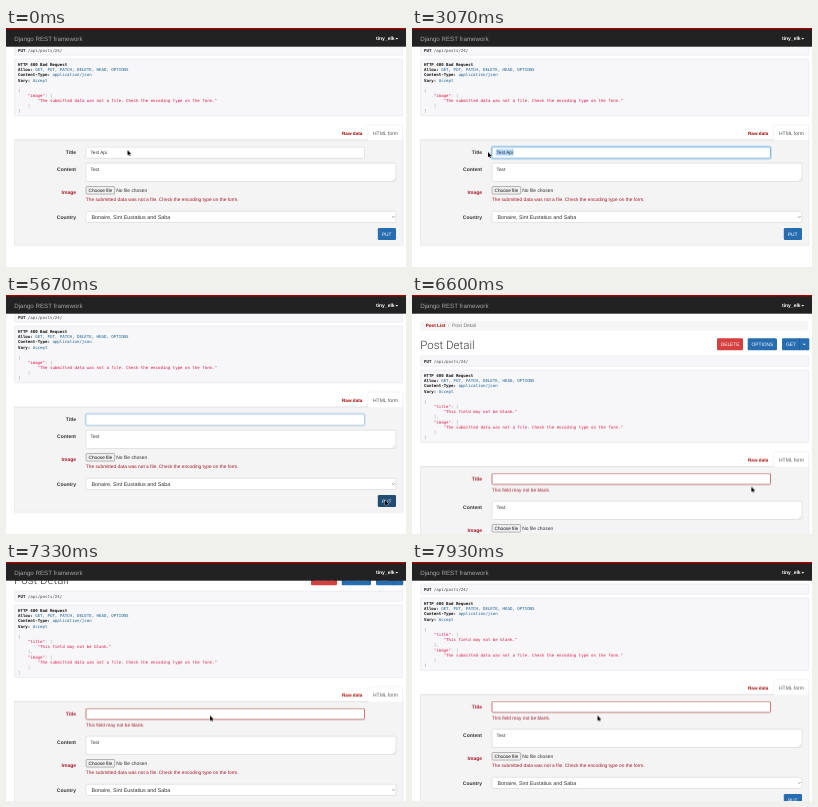
An HTML page that plays this animation: 400x239 px, repeating every 8 s.

```html
<!DOCTYPE html>
<html lang="en">
<head>
<meta charset="utf-8">
<title>Post Detail</title>
<style>
html, body { margin: 0; width: 100%; height: 100%; overflow: hidden; background: #fff; }
svg { display: block; width: 100%; height: 100%; }
text { font: 5px "Liberation Sans", Arial, sans-serif; fill: #333; text-rendering: geometricPrecision; }
.code text { font: 4.085px "DejaVu Sans Mono", "Liberation Mono", monospace; fill: #48484c; }
.code .b { font-weight: bold; fill: #111; }
.code .lit { fill: #195f91; }
.code .str { fill: #d14; }
.code .pun { fill: #93a1a1; }
.label { font-weight: bold; text-anchor: end; }
.bad { fill: #a8182a; }
.help { font-size: 4.8px; }
.link { font-weight: bold; fill: #a30000; }
.btn { fill: #fff; font-size: 4.85px; }
.field { fill: #fff; stroke: #ccc; stroke-width: .5; }
.pre { fill: #f7f7f9; stroke: #e1e1e8; stroke-width: .5; }
.panel { fill: #f4f4f4; stroke: #e0e0e0; stroke-width: .5; }

/* every part shares one 8 s clock */
.scroll, .old, .new, .grow, .error-gap, .focus, .select, .value, .caret, .press, .cursor, .shown {
  animation: 8s step-end infinite;
}
.scroll { animation-name: scroll; }
.old { animation-name: old; }
.new { animation-name: new; }
.grow { animation-name: grow; }
.error-gap { animation-name: gap; }
.focus { animation-name: focus; animation-timing-function: linear; }
.select { animation-name: select; }
.value { animation-name: value; }
.caret { animation-name: caret; }
.press { animation-name: press; }
.cursor { animation-name: cursor; animation-timing-function: ease-in-out; }
.shown { animation-name: shown; }

@keyframes scroll {
  0% { transform: translateY(-44px); }
  75% { transform: translateY(0); }
  86.6% { transform: translateY(0); animation-timing-function: ease-in-out; }
  91.63% { transform: translateY(-32px); animation-timing-function: ease-out; }
  95.9%, 100% { transform: translateY(-39px); }
}
@keyframes old { 0% { opacity: 1; } 75%, 100% { opacity: 0; } }
@keyframes new { 0% { opacity: 0; } 75%, 100% { opacity: 1; } }
@keyframes grow { 0% { transform: translateY(-15.6px); } 75%, 100% { transform: none; } }
@keyframes gap { 0% { transform: translateY(-11.4px); } 75%, 100% { transform: none; } }
@keyframes focus {
  0%, 10.8% { opacity: 0; }
  12.6%, 70% { opacity: 1; }
  71.8%, 100% { opacity: 0; }
}
@keyframes select { 0% { opacity: 0; } 37.5% { opacity: 1; } 41.6%, 100% { opacity: 0; } }
@keyframes value { 0% { opacity: 1; } 41.6%, 100% { opacity: 0; } }
@keyframes caret {
  0% { opacity: 0; }
  41.6% { opacity: 1; }
  48.3% { opacity: 0; }
  55% { opacity: 1; }
  61.6% { opacity: 0; }
  68.3% { opacity: 1; }
  70%, 100% { opacity: 0; }
}
@keyframes press { 0% { fill: #286db0; } 70% { fill: #204d74; } 75%, 100% { fill: #286db0; } }
@keyframes shown { 0% { opacity: 1; } 41.6% { opacity: 0; } 43.3%, 100% { opacity: 1; } }
@keyframes cursor {
  0% { transform: translate(121.5px, 122px); }
  4.1%, 5.8% { transform: translate(76px, 122px); }
  9.1%, 10% { transform: translate(89px, 124px); animation-timing-function: linear; }
  17.5% { transform: translate(133px, 127px); animation-timing-function: ease-out; }
  20.9%, 21.4% { transform: translate(164px, 136px); }
  31.6% { transform: translate(88px, 125px); }
  34.1%, 42.5% { transform: translate(76px, 124px); animation-timing-function: step-end; }
  43.3% { transform: translate(100px, 128px); }
  46.6%, 47.5% { transform: translate(156px, 148.5px); }
  50.9%, 52.5% { transform: translate(243px, 201.5px); animation-timing-function: ease-out; }
  57.5% { transform: translate(327.5px, 214.5px); }
  63.4% { transform: translate(350px, 215px); }
  68.75%, 81.6% { transform: translate(379px, 205px); animation-timing-function: linear; }
  82.5% { transform: translate(340.5px, 192px); animation-timing-function: ease-out; }
  85%, 98.2% { transform: translate(204px, 153.5px); }
  99.1%, 100% { transform: translate(185.5px, 153.5px); }
}
</style>
</head>
<body>
<svg viewBox="0 0 400 239" preserveAspectRatio="none">
  <rect width="400" height="239" fill="#fff"/>
  <g class="scroll">
    <!-- heading -->
    <rect x="8.5" y="25.7" width="388" height="9.8" rx="1.2" fill="#f5f5f5"/>
    <text class="link" x="13.7" y="32.2" style="font-size:4.65px">Post List</text>
    <text x="36" y="32.2" style="fill:#bbb">/</text>
    <text x="40" y="32.2" style="fill:#777">Post Detail</text>
    <text x="8.3" y="54.3" style="font:300 11.5px Roboto,'Liberation Sans',sans-serif">Post Detail</text>
    <rect x="305" y="43.3" width="26" height="12" rx="1.3" fill="#d43f3f"/>
    <text class="btn" x="308.7" y="51">DELETE</text>
    <rect x="335.7" y="43.3" width="29.3" height="12" rx="1.3" fill="#286db0"/>
    <text class="btn" x="339.5" y="51">OPTIONS</text>
    <rect x="370" y="43.3" width="27.3" height="12" rx="1.3" fill="#286db0"/>
    <path d="M387.5 43.3v12" stroke="#1f5a94" stroke-width=".5"/>
    <text class="btn" x="374" y="51">GET</text>
    <path d="M390.9 48.7h2.8l-1.4 1.5z" fill="#fff"/>

    <!-- request and response -->
    <g class="code">
      <rect class="pre" x="8.6" y="61" width="388" height="10.2" rx="1"/>
      <text x="12" y="67.6"><tspan class="b">PUT</tspan> /api/posts/24/</text>
      <rect class="pre old" x="8.6" y="75" width="388" height="56.8" rx="1"/>
      <rect class="pre new" x="8.6" y="75" width="388" height="72.4" rx="1"/>
      <text class="b" x="12" y="82">HTTP 400 Bad Request</text>
      <text x="12" y="87.2"><tspan class="b">Allow:</tspan> <tspan class="lit">GET, PUT, PATCH, DELETE, HEAD, OPTIONS</tspan></text>
      <text x="12" y="92.4"><tspan class="b">Content-Type:</tspan> <tspan class="lit">application/json</tspan></text>
      <text x="12" y="97.6"><tspan class="b">Vary:</tspan> <tspan class="lit">Accept</tspan></text>
      <text class="pun" x="12" y="107.8">{</text>
      <g class="new">
        <text x="21.8" y="113"><tspan class="str">"title"</tspan><tspan class="pun">: [</tspan></text>
        <text class="str" x="31.7" y="118.2">"This field may not be blank."</text>
        <text class="pun" x="21.8" y="123.4">],</text>
      </g>
      <g class="grow">
        <text x="21.8" y="128.4"><tspan class="str">"image"</tspan><tspan class="pun">: [</tspan></text>
        <text class="str" x="31.7" y="133.6">"The submitted data was not a file. Check the encoding type on the form."</text>
        <text class="pun" x="21.8" y="138.8">]</text>
        <text class="pun" x="12" y="144">}</text>
      </g>
    </g>

    <!-- form -->
    <g class="grow">
      <rect class="panel old" x="8.6" y="171.7" width="388.4" height="105.3"/>
      <rect class="panel new" x="8.6" y="171.7" width="388.4" height="116.7"/>
      <path d="M8.6 171.7H362V158q0-1.2 1.2-1.2H395.4q1.2 0 1.2 1.2V171.7" fill="none" stroke="#ddd" stroke-width=".5"/>
      <rect x="362.3" y="157.2" width="34" height="14.7" fill="#fff"/>
      <text class="link" x="336" y="166.3" style="font-size:4.65px">Raw data</text>
      <text x="367" y="166.3" style="fill:#555">HTML form</text>

      <g class="old">
        <text class="label" x="70" y="185.8">Title</text>
        <rect class="field" x="80" y="178.7" width="278.5" height="11.2" rx="1.2"/>
      </g>
      <g class="focus">
        <rect x="79.4" y="178.1" width="279.7" height="12.4" rx="1.7" fill="none" stroke="#66afe9" stroke-opacity=".35" stroke-width="1.6"/>
        <rect x="80" y="178.7" width="278.5" height="11.2" rx="1.2" fill="#fff" stroke="#5aa7e6" stroke-width=".7"/>
      </g>
      <rect class="select" x="83.8" y="180.8" width="17.8" height="6.4" fill="#b0d4fb"/>
      <text class="value" x="84.5" y="185.8" style="font-size:4.7px">Test Api</text>
      <path class="caret" d="M84.7 181.4v5.4" stroke="#222" stroke-width=".5"/>
      <g class="new">
        <text class="label bad" x="70" y="185.2">Title</text>
        <rect x="80" y="178.4" width="278.5" height="11" rx="1.2" fill="#fff" stroke="#a94442" stroke-width=".7"/>
        <text class="help bad" x="79.8" y="196.3">This field may not be blank.</text>
      </g>

      <g class="error-gap">
        <text class="label" x="70" y="213.7">Content</text>
        <rect class="field" x="80" y="206.2" width="310" height="18.3" rx="1.2"/>
        <text x="84.5" y="213.7" style="font-size:4.75px">Test</text>
        <path d="M386.8 223.7l2.4-2.4M388.1 223.7l1.1-1.1" stroke="#999" stroke-width=".35"/>

        <text class="label bad" x="70" y="236.8">Image</text>
        <rect x="80.1" y="229.5" width="28.6" height="7.6" rx="1" fill="#efefef" stroke="#777" stroke-width=".5"/>
        <text x="82.6" y="235" style="font-size:4.7px;fill:#111">Choose file</text>
        <text x="110.2" y="235" style="font-size:4.9px">No file chosen</text>
        <text class="help bad" x="79.8" y="244">The submitted data was not a file. Check the encoding type on the form.</text>

        <text class="label" x="70" y="261.7">Country</text>
        <rect class="field" x="80" y="254.3" width="310" height="11.2" rx="1.2"/>
        <text x="85.5" y="261.8" style="font-size:5.36px">Bonaire, Sint Eustatius and Saba</text>
        <path d="M386.2 259.3l1.3 1.3 1.3-1.3" fill="none" stroke="#444" stroke-width=".5"/>

        <rect class="press" x="371.8" y="271" width="18.2" height="12" rx="1.3" fill="#286db0"/>
        <text class="btn" x="375.9" y="278.7">PUT</text>
      </g>
    </g>
  </g>

  <!-- navigation bar -->
  <rect width="400" height="18.7" fill="#222"/>
  <rect width="400" height="1.4" fill="#a30000"/>
  <text x="8.2" y="12.7" style="font-size:6.2px;fill:#a5a5a5">Django REST framework</text>
  <text x="370" y="12.3" style="font-weight:bold;fill:#fff">tiny_elk</text>
  <path d="M389.4 10.1h2.8l-1.4 1.5z" fill="#fff"/>

  <g class="cursor">
    <path class="shown" d="M0 0V5.2L1.2 4.2 2 6 2.9 5.6 2.1 3.9H3.7Z" fill="#000" stroke="#fff" stroke-width=".5" paint-order="stroke"/>
  </g>
</svg>
</body>
</html>
```
